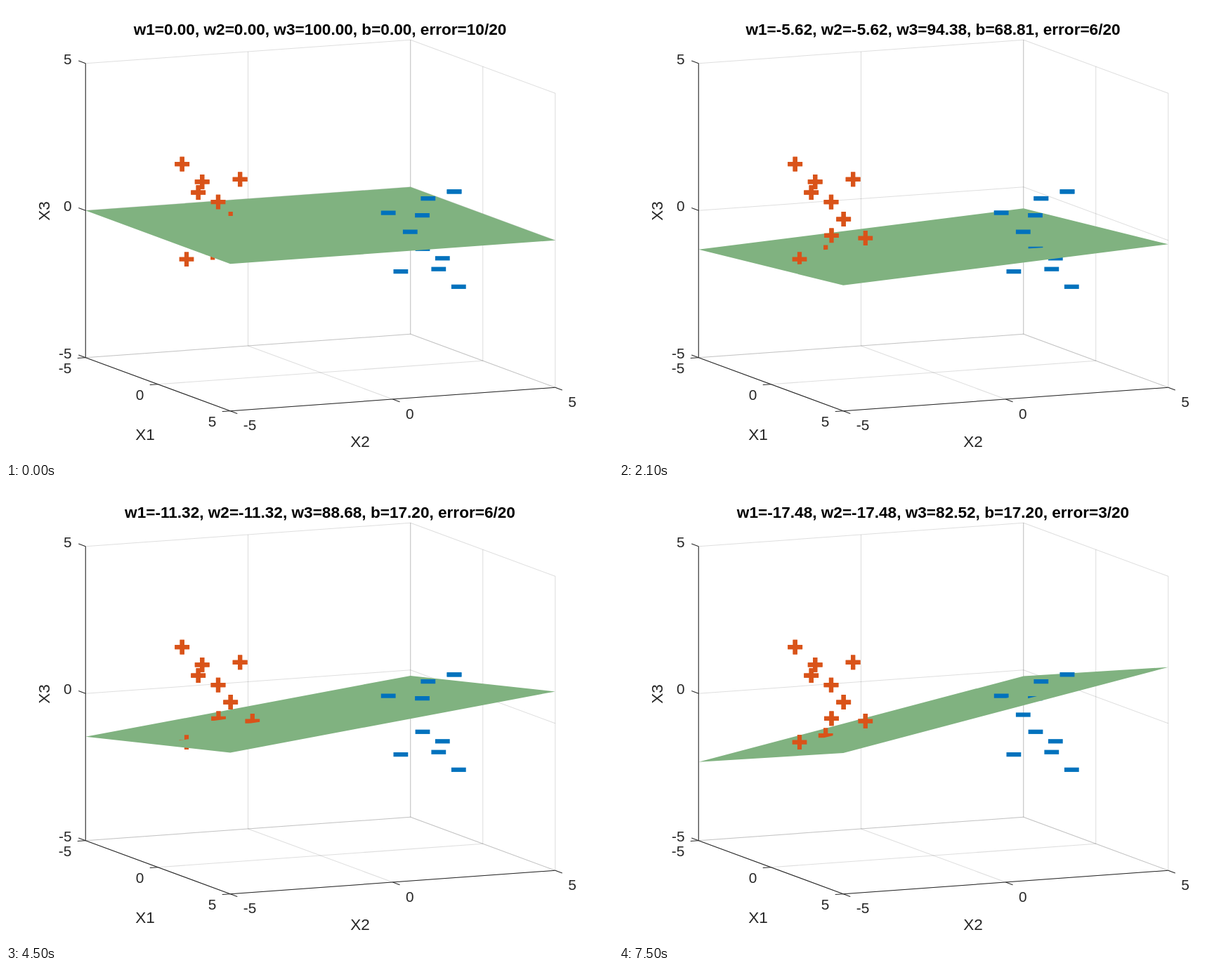
An HTML page that plays this animation: 864x648 px, repeating every 8 s.

```html
<!DOCTYPE html>
<html lang="en">
<head>
<meta charset="utf-8">
<title>Perceptron plane</title>
<style>
  html, body { margin: 0; width: 100%; height: 100%; overflow: hidden; background: #fff; }
  svg { display: block; width: 100%; height: 100%; }
  text { font-family: "Liberation Sans", Arial, sans-serif; font-size: 20.8px; fill: #262626; }
  .name { font-size: 22.6px; text-anchor: middle; }
  #title { font-size: 22.6px; font-weight: bold; fill: #000; text-anchor: middle; }
  #grid, #axes { fill: none; stroke: #262626; stroke-width: 1.05; }
  #grid { stroke-opacity: .15; }
  #plane { fill: #80b280; }
  .marker { fill: none; stroke-width: 6.25; }
</style>
</head>
<body>
<svg viewBox="0 0 864 648">
  <defs id="clips"></defs>
  <g id="grid"></g>
  <g id="behind"></g>
  <polygon id="plane"/>
  <g id="front"></g>
  <g id="axes"></g>
  <g id="labels"></g>
  <text id="title" x="447" y="41.4"></text>
</svg>
<script>
const LOOP = 8000, BIAS_STEP = 17.202;
const CX = 447.5, CY = 312.5;

// The plane holds each pose, then waits halfway to the next one.
const POSES = [
  { time: 0, hold: 300, weight: 0, steps: 0 },
  { time: 900, hold: 600, weight: -3.58, steps: 2 },
  { time: 2100, hold: 1200, weight: -5.62, steps: 4 },
  { time: 3300, hold: 600, weight: -8.18, steps: 3 },
  { time: 4500, hold: 600, weight: -11.32, steps: 1 },
  { time: 5400, hold: 1500, weight: -14.34, steps: -1 },
  { time: 7500, hold: 500, weight: -17.48, steps: 1 }
];

// Positive samples: offset from the centre and depth towards the viewer.
// The negative samples mirror them through the centre.
const SAMPLES = [
  [-196.8, -87.3], [-168.3, -62.2], [-173.8, -46.8], [-114.4, -65.6],
  [-145.5, -33.3, -1.5], [-127.8, -9, -1.62], [-145, 14.3, -2.25],
  [-96.7, 18, -.27], [-153.3, 38.5, -1.05], [-190.5, 48.2, 1.55]
];

const $ = id => document.getElementById(id);

function add(parent, tag, attrs, text = "") {
  const el = document.createElementNS("http://www.w3.org/2000/svg", tag);
  for (const key in attrs) el.setAttribute(key, attrs[key]);
  el.textContent = text;
  return parent.appendChild(el);
}

const project = (x1, x2, x3) => [
  CX + 20.6 * x1 + 46.25 * x2,
  CY + 7.6 * x1 - 3.35 * x2 - 41.9 * x3
];

const line = (parent, a, b) => add(parent, "path", { d: `M${a}L${b}` });

function tick([x, y], dx, dy, label, anchor, labelX, labelY) {
  line($("axes"), [x, y], [x + dx, y + dy]);
  add($("labels"), "text", { x: x + labelX, y: y + labelY, "text-anchor": anchor }, label);
}

function drawBox() {
  const grid = $("grid"), axes = $("axes"), labels = $("labels");
  for (const v of [-5, 0, 5]) {
    line(grid, project(-5, v, -5), project(-5, v, 5));
    line(grid, project(-5, -5, v), project(-5, 5, v));
    line(grid, project(v, 5, -5), project(v, 5, 5));
    line(grid, project(-5, 5, v), project(5, 5, v));
    line(grid, project(v, -5, -5), project(v, 5, -5));
    line(grid, project(-5, v, -5), project(5, v, -5));

    tick(project(-5, -5, v), -10, -3.7, v, "end", -19.7, 1.2);
    tick(project(v, -5, -5), -11.5, .8, v, "end", -20, 22.4);
    tick(project(5, v, -5), 10, 3.7, v, "start", 18.5, 27.7);
  }
  line(axes, project(-5, -5, -5), project(-5, -5, 5));
  line(axes, project(-5, -5, -5), project(5, -5, -5));
  line(axes, project(5, -5, -5), project(5, 5, -5));
  add(labels, "text", { class: "name", x: 198, y: 617.8 }, "X1");
  add(labels, "text", { class: "name", x: 504, y: 627.8 }, "X2");
  add(labels, "text", { class: "name", transform: "translate(62 292) rotate(-90)" }, "X3");
}

// Each marker is drawn behind the plane, and again in front of it
// where it lies above the line in which it cuts the plane.
function makeMarker([dx, dy, depth = 0], index, sign) {
  const x = CX + sign * dx, y = CY + sign * dy;
  const id = `cut${sign * (index + 1)}`;
  const clip = add(add($("clips"), "clipPath", { id }), "polygon", {});
  const bar = `M${x - 10.4} ${y}h20.8`;
  const attrs = {
    class: "marker",
    d: sign > 0 ? `${bar}M${x} ${y - 10.4}v20.8` : bar,
    stroke: sign > 0 ? "#d95319" : "#0072bd"
  };
  add($("behind"), "path", attrs);
  add($("front"), "path", { ...attrs, "clip-path": `url(#${id})` });
  return { x, y, depth: sign * depth, sign, clip };
}

// Screen height at which the plane has the given depth at screen x
function cutHeight(x, depth, slope, offset) {
  const across = (x - CX) / 50.64;
  const x3 = (offset + slope * (.5068 * depth + 1.3202 * across)) / (1 + .1003 * slope);
  return CY + 8.31 * depth - 43.55 * x3;
}

drawBox();
const markers = [1, -1].flatMap(sign => SAMPLES.map((s, i) => makeMarker(s, i, sign)));

function show(w, steps) {
  const w3 = 100 + w, b = steps * BIAS_STEP;
  const slope = -w / w3, offset = -b / w3;
  const corners = [[-5, -5], [5, -5], [5, 5], [-5, 5]];
  $("plane").setAttribute("points",
    corners.map(([p, q]) => project(p, q, offset + slope * (p + q))).join(" "));

  let errors = 0;
  for (const { x, y, depth, sign, clip } of markers) {
    const cut = dx => cutHeight(x + dx, depth, slope, offset);
    clip.setAttribute("points",
      `${x - 12},0 ${x + 12},0 ${x + 12},${cut(12)} ${x - 12},${cut(-12)}`);
    if ((cut(0) - y) * sign < 0) errors++;
  }
  const [ws, w3s, bs] = [w, w3, b].map(v => v.toFixed(2));
  $("title").textContent = `w1=${ws}, w2=${ws}, w3=${w3s}, b=${bs}, error=${errors}/20`;
}

function showAt(t) {
  const i = POSES.findLastIndex(p => p.time <= t);
  const pose = POSES[i];
  const next = t < pose.time + pose.hold ? pose : POSES[(i + 1) % POSES.length];
  show((pose.weight + next.weight) / 2, (pose.steps + next.steps) / 2);
}

const start = performance.now();
function frame() {
  showAt((performance.now() - start) % LOOP);
  requestAnimationFrame(frame);
}
frame();
</script>
</body>
</html>
```
